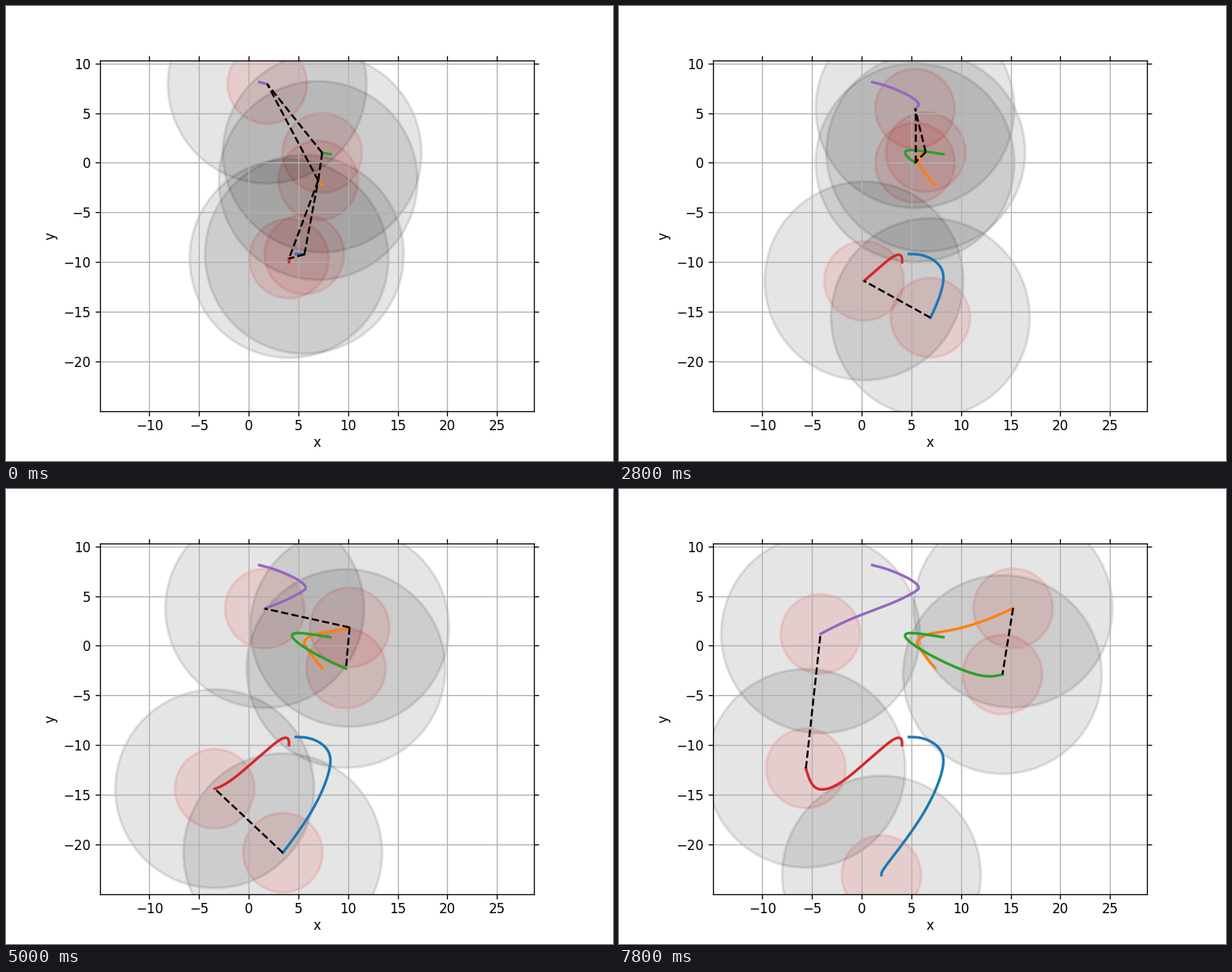
A matplotlib script for the animation above (8 s loop, 768 by 576 pixels).

```python
import itertools

import numpy as np
import matplotlib.pyplot as plt
from matplotlib.animation import FuncAnimation

FRAMES, INTERVAL = 40, 200
BODY, REACH, HORIZON = 4, 10, 10

# Every agent glides through a few key points at these frame times
KEYS = np.array([-1.3, 0, 5, 9, 14, 21, 31, 39])
AGENTS = {
    "tab:blue": [(4.75, -9.19), (5.61, -9.23), (8.00, -10.62), (8.09, -12.6),
                 (6.92, -15.6), (4.62, -19.26), (2.27, -22.4), (1.99, -23.09)],
    "tab:orange": [(7.40, -2.24), (7.00, -1.79), (5.77, -0.12), (5.62, 0.49),
                   (6.45, 1.07), (8.63, 1.50), (12.5, 2.59), (15.24, 3.78)],
    "tab:green": [(8.23, 0.86), (7.40, 0.99), (4.81, 1.27), (4.40, 0.90),
                  (5.37, 0.00), (8.04, -1.51), (12.14, -3.02), (14.17, -2.9)],
    "tab:red": [(4.06, -10.02), (4.06, -9.65), (3.30, -9.39), (2.08, -10.3),
                (0.24, -11.9), (-2.23, -13.85), (-4.74, -14.21),
                (-5.61, -12.34)],
    "tab:purple": [(1.07, 8.12), (1.87, 7.92), (4.74, 6.76), (5.69, 6.00),
                   (5.37, 5.45), (3.34, 4.42), (-1.11, 2.67), (-4.14, 1.19)],
}


def natural_spline(knots, points):
    """Natural cubic spline through points; it runs on straight past the ends."""
    def basis(t):
        t = np.atleast_1d(t)[:, None] / 10
        return np.hstack([np.abs(t - knots / 10) ** 3, np.ones_like(t), t])

    full = basis(knots)
    n = len(knots)
    system = np.vstack([full, np.hstack([full[:, n:].T, np.zeros((2, 2))])])
    weights = np.linalg.solve(system, np.vstack([points, np.zeros((2, 2))]))
    return lambda t: basis(t) @ weights


def linked(a, b, k):
    """True if two agents come within reach inside the look-ahead window."""
    t = np.arange(k, k + HORIZON + 1)
    return np.hypot(*(a(t) - b(t)).T).min() < REACH


paths = [natural_spline(KEYS, points) for points in AGENTS.values()]
pairs = list(itertools.combinations(paths, 2))

fig, ax = plt.subplots(figsize=(6.4, 4.8), dpi=120)
ax.set_aspect("equal")
ax.set_xlim(-14.955, 28.73)
ax.set_ylim(-24.995, 10.285)
ax.set_xlabel("x", labelpad=1.6)
ax.set_ylabel("y")
ax.tick_params(top=True, right=True)
ax.tick_params(axis="x", pad=2.9)
ax.grid(True)


def disc(radius, color):
    return ax.add_patch(plt.Circle((0, 0), radius, color=color,
                                   alpha=0.1, lw=2))


bodies = [disc(BODY, "red") for _ in paths]
reaches = [disc(REACH, "black") for _ in paths]
trails = [ax.plot([], [], color=color, lw=2)[0] for color in AGENTS]
links = [ax.plot([], [], "k--", lw=1.5)[0] for _ in pairs]


def update(k):
    past = np.linspace(KEYS[0], k, 200)
    for path, body, reach, trail in zip(paths, bodies, reaches, trails):
        body.center = reach.center = path(k)[0]
        trail.set_data(*path(past).T)
    for (a, b), link in zip(pairs, links):
        link.set_data(*np.vstack([a(k), b(k)]).T)
        link.set_visible(linked(a, b, k))
    return trails + links


anim = FuncAnimation(fig, update, frames=FRAMES, interval=INTERVAL,
                     init_func=lambda: update(0), repeat=True, repeat_delay=0)
plt.show()
```
